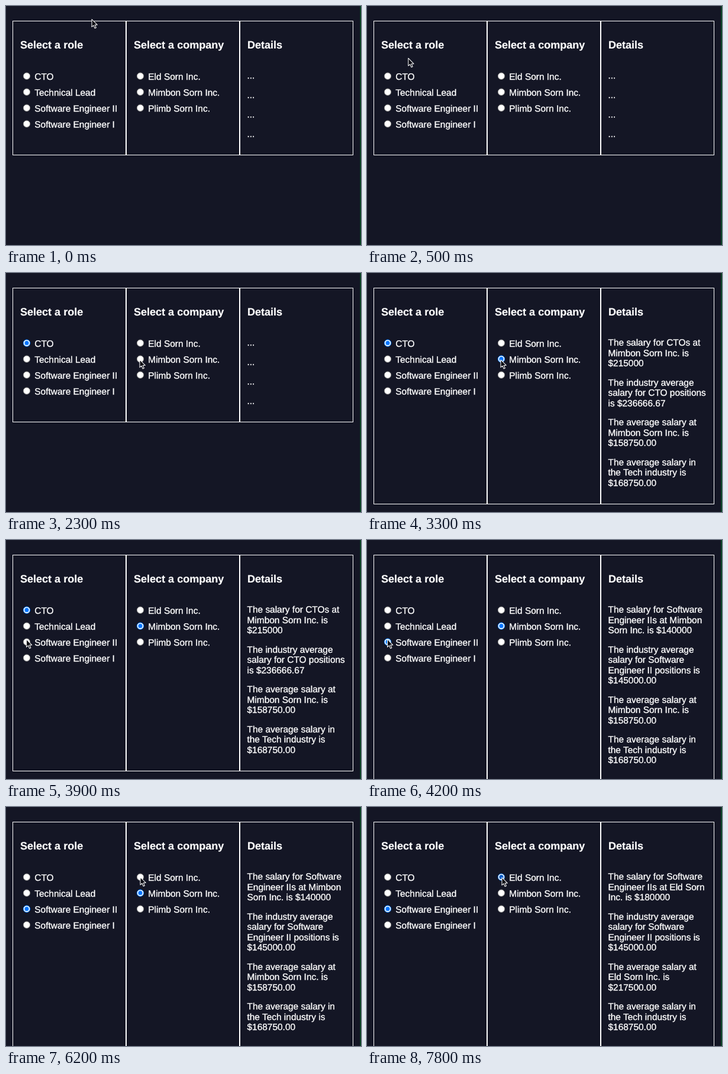
Animation, 600 px wide and 405 px high, one loop 7.9 s. Source, as an HTML page:

```html
<!DOCTYPE html>
<html lang="en">
<head>
<meta charset="utf-8">
<title>Salary picker</title>
<style>
  html, body { margin: 0; width: 100%; height: 100%; overflow: hidden; background: #141625; }
  svg { display: block; width: 600px; height: 405px; }
  text {
    font: 15.44px "Liberation Sans", Arial, Helvetica, sans-serif;
    fill: #fff;
    stroke: #fff;
    stroke-width: .35px;
    text-rendering: geometricPrecision;
    white-space: pre;
  }
  .heading { font-size: 18.06px; font-weight: bold; stroke-width: .2px; }
  .panel { fill: none; stroke: #fff; }
</style>
</head>
<body>
<svg id="stage" viewBox="0 0 600 405">
  <rect x="598.4" width="1.6" height="405" fill="#064a22"/>
</svg>
<script>
const LOOP = 7900, STEP = 100;
const COLUMN = 192, TEXT_X = 23.9, LINE = 17.37, GAP = 15.44, ROW = 27;
const BLUE = '#0075ff', DARK_BLUE = '#005cc8';
const stage = document.getElementById('stage');

function add(parent, tag, attrs, content = '') {
  const node = document.createElementNS('http://www.w3.org/2000/svg', tag);
  for (const key in attrs) node.setAttribute(key, attrs[key]);
  node.textContent = content;
  parent.append(node);
  return node;
}

const roles = ['CTO', 'Technical Lead', 'Software Engineer II', 'Software Engineer I'];
const companies = ['Eld Sorn Inc.', 'Mimbon Sorn Inc.', 'Plimb Sorn Inc.'];

const panels = ['Select a role', 'Select a company', 'Details'].map((title, i) => {
  add(stage, 'text', { x: TEXT_X + i * COLUMN, y: 72.2, class: 'heading' }, title);
  return add(stage, 'rect', { x: 11.5 + i * COLUMN, y: 25.5, width: COLUMN - 1, class: 'panel' });
});

function radioGroup(labels, column) {
  const cx = 35 + column * COLUMN;
  return labels.map((label, i) => {
    const cy = 118.7 + i * ROW;
    add(stage, 'text', { x: cx + 13.3, y: cy + 6.4 }, label);
    return {
      ring: add(stage, 'circle', { cx, cy, r: 5.75, fill: '#fff' }),
      dot: add(stage, 'circle', { cx, cy, r: 3.6 })
    };
  });
}
const roleRadios = radioGroup(roles, 0);
const companyRadios = radioGroup(companies, 1);
const details = add(stage, 'g', {});
const cursor = add(stage, 'path', {
  d: 'M0 0V14L3.2 11.2 5.6 16.6 8 15.5 5.7 10.3H10Z',
  fill: '#0b0c14', stroke: '#fff', 'stroke-width': 1.1, 'stroke-linejoin': 'round'
});

const industry = 'The average salary in|the Tech industry is|$168750.00';
const engineerAverage = 'The industry average|salary for Software|Engineer II positions is|$145000.00';
const mimbonAverage = 'The average salary at|Mimbon Sorn Inc. is|$158750.00';

// Details shown from each moment on.
const reports = [
  [0, ['...', '...', '...', '...']],
  [2400, ['The salary for CTOs at|Mimbon Sorn Inc. is|$215000',
    'The industry average|salary for CTO positions|is $236666.67', mimbonAverage, industry]],
  [4200, ['The salary for Software|Engineer IIs at Mimbon|Sorn Inc. is $140000',
    engineerAverage, mimbonAverage, industry]],
  [6300, ['The salary for Software|Engineer IIs at Eld Sorn|Inc. is $180000',
    engineerAverage, 'The average salary at|Eld Sorn Inc. is|$217500.00', industry]]
];

// [time, selected index, accent]
const roleStates = [[0, -1], [1000, 0, DARK_BLUE], [1400, 0, BLUE], [4200, 2, BLUE]];
const companyStates = [[0, -1], [2400, 1, BLUE], [6300, 0, BLUE], [7200, 0, DARK_BLUE]];

// [time, x, y] with smooth motion between neighbours.
const path = [
  [0, 145, 22.5], [800, 35, 119], [1100, 35, 119], [1200, 43, 118.5], [1900, 225, 146.5],
  [2000, 226, 147], [3300, 226, 147], [3900, 34.5, 168.5], [4200, 34.5, 168.5],
  [4800, 31, 160], [5000, 212.5, 138.5], [5600, 227, 119], [7700, 227, 119],
  [7800, 228, 119.5], [LOOP, 228, 119.5]
];

const current = (states, t) => states.filter(state => state[0] <= t).pop();

function cursorAt(t) {
  const next = path.findIndex(point => point[0] > t);
  const [t0, x0, y0] = path[next - 1], [t1, x1, y1] = path[next];
  const u = (t - t0) / (t1 - t0), ease = u * u * (3 - 2 * u);
  return [x0 + (x1 - x0) * ease, y0 + (y1 - y0) * ease];
}

function paintRadios(radios, [, selected, accent]) {
  radios.forEach(({ ring, dot }, i) => {
    const on = i === selected;
    ring.setAttribute('stroke', on ? accent : '#767676');
    dot.setAttribute('fill', on ? accent : 'none');
  });
}

let shown;
function showReport(report) {
  if (report === shown) return;
  shown = report;
  details.replaceChildren();
  let y = 123.3, lines = 0;
  for (const paragraph of report[1]) {
    for (const line of paragraph.split('|')) {
      add(details, 'text', { x: TEXT_X + 2 * COLUMN - .4, y }, line);
      y += LINE;
      lines++;
    }
    y += GAP;
  }
  panels.forEach(panel => panel.setAttribute('height', Math.round(227 + (lines - 4) * LINE)));
}

function draw(now) {
  const t = Math.floor((now % LOOP) / STEP) * STEP;
  paintRadios(roleRadios, current(roleStates, t));
  paintRadios(companyRadios, current(companyStates, t));
  showReport(current(reports, t));
  cursor.setAttribute('transform', `translate(${cursorAt(t)}) scale(.92)`);
}

let start;
function tick(now) {
  start ??= now;
  draw(now - start);
  requestAnimationFrame(tick);
}
draw(0);
requestAnimationFrame(tick);
</script>
</body>
</html>
```
